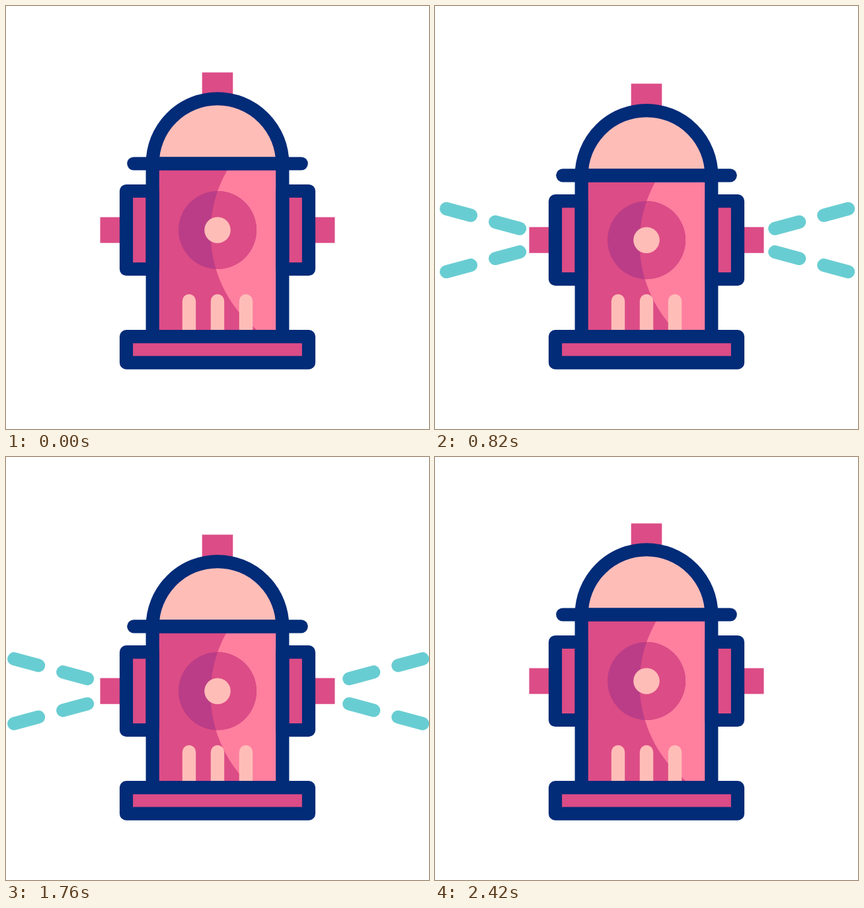
Write an HTML page that moves like this. It is 640 px wide and 640 px high and loops after 2.82 s.

```html
<!DOCTYPE html>
<html lang="en">
<head>
<meta charset="utf-8">
<title>Hydrant</title>
<style>
  html, body { margin: 0; width: 100%; height: 100%; overflow: hidden; background: #fff; }
  svg { display: block; width: 100%; height: 100%; }
  .pink { fill: #dc4c86; }
  .peach { fill: #ffbdb8; }
  .line { stroke: #022b78; stroke-width: 20.2; stroke-linecap: round; stroke-linejoin: round; }
</style>
</head>
<body>
<svg viewBox="0 0 640 640">
  <defs>
    <clipPath id="body"><rect x="222" y="225" width="196" height="275"/></clipPath>
    <clipPath id="shine"><circle cx="499.5" cy="343" r="190"/></clipPath>
  </defs>
  <path id="water" fill="none" stroke="#68cdd2" stroke-width="20" stroke-linecap="round"/>
  <rect id="cap" class="pink" x="296.7" y="100.5" width="46.6" height="40"/>
  <rect id="fill" class="pink" x="222" y="238" width="196" height="262"/>
  <g clip-path="url(#body)">
    <g class="mid">
      <circle cx="499.5" cy="343" r="190" fill="#ff7f9f"/>
      <circle cx="320" cy="339" r="59" fill="#bb3d87"/>
      <circle cx="320" cy="339" r="59" class="pink" clip-path="url(#shine)"/>
      <circle cx="320" cy="339" r="19.8" class="peach"/>
    </g>
  </g>
  <path d="M277 500V446.200M320 500V446.200M363 500V446.200" stroke="#ffbdb8" stroke-width="20.400" stroke-linecap="round"/>
  <g class="mid pink">
    <path d="M142.500 319.400H182V358.600H142.500ZM497.500 319.400H458V358.600H497.500Z"/>
    <path class="line" d="M182 280H221.700V398H182ZM458 280H418.300V398H458Z"/>
  </g>
  <path id="sides" class="line" fill="none"/>
  <g id="dome">
    <path class="line peach" d="M221.700 238.500A98.300 98.300 0 0 1 418.300 238.500Z"/>
    <path class="line" d="M193.300 238.500H446.700"/>
  </g>
  <rect class="line pink" x="182" y="500.100" width="276" height="39.600"/>
</svg>
<script>
const LOOP = 2820, DASH = 37, PERIOD = 74, DASHES = 6, SLOPE = 0.27;
const $ = id => document.getElementById(id);
const mids = document.querySelectorAll('.mid');

const ease = (t, start, length) => {
  const p = Math.min(1, Math.max(0, (t - start) / length));
  return p * p * (3 - 2 * p);
};
const shift = (el, y) => el.setAttribute('transform', `translate(0 ${y})`);

// Horizontal distance covered by the first dash: speeds up, then runs steadily.
function travel(t) {
  if (t < 540) return 38 * ((t - 300) / 240) ** 2;
  return 38 + 0.316 * (t - 540) + 0.02 * Math.max(0, t - 1560);
}

function waterPath(t) {
  if (t < 295 || t > 2180) return '';
  const reach = t < 300 ? 0 : travel(t);
  let d = '';
  for (let n = 0; n < DASHES; n++) {
    const tip = reach - n * PERIOD;
    if (tip < 0) break;
    const tail = Math.max(0, tip - DASH);
    for (const sx of [-1, 1]) for (const sy of [-1, 1]) {
      const point = s => `${321.2 + sx * (177.2 + s)} ${354.4 + sy * (13.4 + s * SLOPE)}`;
      d += `M${point(tail)}L${point(tip + 0.01)}`;
    }
  }
  return d;
}

function draw(now) {
  const t = now % LOOP;
  const press = ease(t, 0, 208) - ease(t, 2205, 208);
  shift($('cap'), 17 * press);
  shift($('dome'), 17.8 * press);
  mids.forEach(el => shift(el, 15.2 * press));
  const top = 238 + 17.8 * press;
  $('fill').setAttribute('y', top);
  $('fill').setAttribute('height', 500 - top);
  $('sides').setAttribute('d', `M221.700 ${top}V500M418.300 ${top}V500`);
  $('water').setAttribute('d', waterPath(t));
}

const start = performance.now();
(function tick() {
  draw(performance.now() - start);
  requestAnimationFrame(tick);
})();
</script>
</body>
</html>
```
